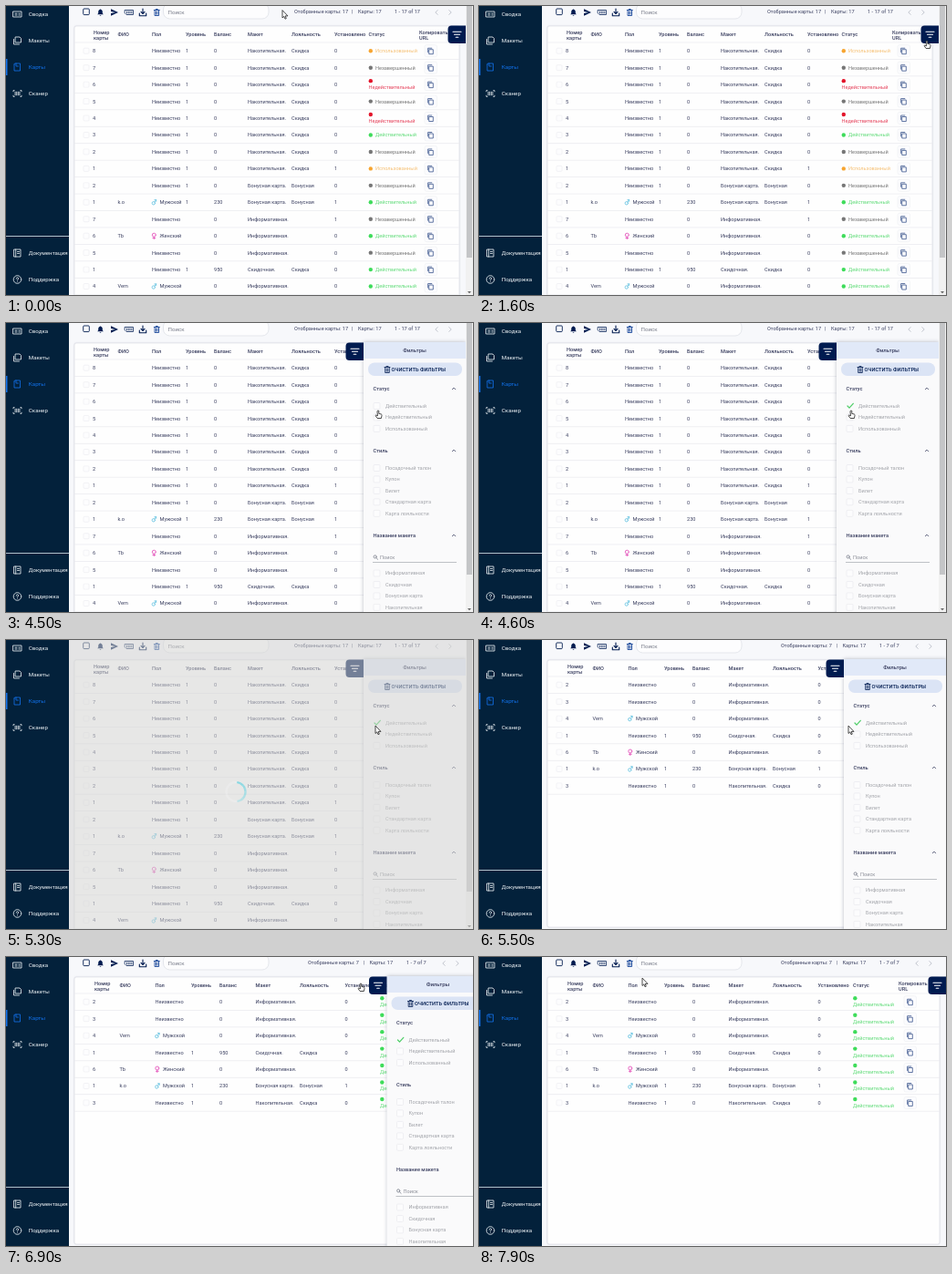
Recreate the animation shown at these times as an HTML page with a canvas. Size 512 px wide and 317 px high, loop 8000 ms.

```html
<!DOCTYPE html>
<html lang="ru">
<head>
<meta charset="utf-8">
<title>Карты</title>
<style>
html, body { margin: 0; width: 100%; height: 100%; overflow: hidden; background: #f7f8fb; }
canvas { display: block; width: 512px; height: 317px; }
</style>
</head>
<body>
<canvas id="stage"></canvas>
<script>
const W = 512, H = 317, LOOP = 8000, STEP = 100;
const SIDEBAR = 69, DRAWER = 112, ROW_TOP = 40, ROW_H = 18.45;
const FONT = 'Roboto, "Open Sans", sans-serif';
const NAVY = '#001b50', INK = '#3a3f60', LINE = '#ebecf0';
const STATUS = {
  used: ['Использованный', '#f7a531', '#f5bf72'],
  open: ['Незавершенный', '#777777', '#747474'],
  bad: ['Недействительный', '#e3142b', '#e5405a'],
  ok: ['Действительный', '#3fdc5b', '#5edb77']
};
const LAYOUT = {
  Н: ['Накопительная.', 'Скидка', '1'],
  Б: ['Бонусная карта.', 'Бонусная', '1'],
  И: ['Информативная.', '', ''],
  С: ['Скидочная.', 'Скидка', '1']
};
// number, layout, installed, status, name, gender, balance
const parse = text => text.split(';').map(r => r.split(','));
const ALL = parse('8,Н,0,used;7,Н,0,open;6,Н,0,bad;5,Н,0,open;4,Н,0,bad;3,Н,0,ok;2,Н,0,open;1,Н,1,used;2,Б,0,open;' +
  '1,Б,1,ok,k.o,m,230;7,И,1,open;6,И,0,ok,Tb,f;5,И,0,open;1,С,0,ok,,,950;4,И,0,ok,Vern,m;3,И,0,ok;2,И,0,ok');
const VALID = parse('2,И,0,ok;3,И,0,ok;4,И,0,ok,Vern,m;1,С,0,ok,,,950;6,И,0,ok,Tb,f;1,Б,1,ok,k.o,m,230;3,Н,0,ok');
const HEADS = ['Номер|карты', 'ФИО', 'Пол', 'Уровень', 'Баланс', 'Макет', 'Лояльность', 'Установлено', 'Статус', 'Копировать|URL'];
const COLS_NARROW = [96, 122.5, 160, 197, 228, 265, 313, 360, 397.5, 453];
const COLS_WIDE = [97, 124.5, 163.5, 203, 234, 273.5, 322, 371.5, 410, 460];
const GROUPS = [
  ['Статус', 72, 91, ['Действительный', 'Недействительный', 'Использованный']],
  ['Стиль', 140, 159, ['Посадочный талон', 'Купон', 'Билет', 'Стандартная карта', 'Карта лояльности']],
  ['Название макета', 233, 274.5, ['Информативная', 'Скидочная', 'Бонусная карта', 'Накопительная']]
];
const PATH = [
  [0, 303, 5], [900, 472, 38], [1600, 491, 38], [2700, 491, 38], [2800, 484, 37], [3600, 407, 80],
  [3900, 408, 96], [4600, 408, 96], [4700, 405, 94.5], [5700, 405, 94.5], [6200, 358, 57.5],
  [6600, 389, 29], [7400, 389, 29], [7900, 179, 23.5]
];
const HAND_TIMES = [[1500, 2100], [3500, 4700], [6000, 7200]];

const canvas = document.getElementById('stage');
const c = canvas.getContext('2d');
const dpr = window.devicePixelRatio || 1;
canvas.width = W * dpr;
canvas.height = H * dpr;

const clamp = v => Math.max(0, Math.min(1, v));
const smooth = v => v * v * (3 - 2 * v);

function text(s, x, y, { size = 5.6, color = INK, weight = 400, align = 'left' } = {}) {
  c.font = `${weight} ${size}px ${FONT}`;
  c.fillStyle = color;
  c.textAlign = align;
  c.textBaseline = 'alphabetic';
  c.fillText(s, x, y + size * 0.35);
}
function rect(x, y, w, h, color) {
  c.fillStyle = color;
  c.fillRect(x, y, w, h);
}
function box(x, y, w, h, r, { fill, stroke, width = 0.8 } = {}) {
  c.beginPath();
  c.roundRect(x, y, w, h, r);
  if (fill) { c.fillStyle = fill; c.fill(); }
  if (stroke) { c.strokeStyle = stroke; c.lineWidth = width; c.stroke(); }
}
// Path data is relative to the icon position.
function icon(d, x, y, { fill, stroke, width = 0.9 } = {}) {
  const p = new Path2D(d);
  c.save();
  c.translate(x, y);
  c.lineJoin = c.lineCap = 'round';
  if (fill) { c.fillStyle = fill; c.fill(p); }
  if (stroke) { c.strokeStyle = stroke; c.lineWidth = width; c.stroke(p); }
  c.restore();
}
function dot(x, y, r, color) {
  c.beginPath();
  c.arc(x, y, r, 0, 7);
  c.fillStyle = color;
  c.fill();
}

const TRASH = 'M-3-2.5H3M-1-3.5H1M-2.3-2.5V3.5H2.3V-2.5M-.8-1V2.2M.8-1V2.2';
const COPY = 'M-3 1.5V-3H1.2M-1.5-1.5H2.7V3.5H-1.5Z';
const LENS = 'M1-.6A1.6 1.6 0 1 1-2.2-.6A1.6 1.6 0 1 1 1-.6M.6.6L2.3 2.3';

function sidebar() {
  rect(0, 0, SIDEBAR, H, '#03213b');
  rect(0, 252, SIDEBAR, 1, '#b4bfca');
  rect(0, 58, 1.5, 18, '#1273ee');
  const items = [
    ['Сводка', 9, 'M-4.5-3H4.5V3H-4.5ZM-2.5-.8H-.5M-2.5 1H-.5M1.5-.8H2.8M1.5 1H2.8'],
    ['Макеты', 38, 'M-4-1.5V4H2M-2-4H2.5L4-2.5V2H-2Z'],
    ['Карты', 67, 'M-3.5-3V4H3V-4H-2.5Q-3.5-4-3.5-3M-1.5-4V-1H1'],
    ['Сканер', 96, 'M-3.4-3.4H-4.5V-2.2M-4.5 2.2V3.4H-3.4M3.4-3.4H4.5V-2.2M4.5 2.2V3.4H3.4M-2.4-1.8V1.8M-.8-1.8V1.8M.8-1.8V1.8M2.4-1.8V1.8'],
    ['Документация', 271, 'M-3.5-4H3.5V4H-3.5ZM-1.8-4V4M0-1.5H2M0 .5H2'],
    ['Поддержка', 300, 'M4.3 0A4.3 4.3 0 1 1-4.3 0A4.3 4.3 0 1 1 4.3 0M-1.2-.9Q-1-2.2 0-2.2Q1.3-2 1.2-.9Q1-.2 0 .5M0 2.1V2.2']
  ];
  for (const [name, y, d] of items) {
    const color = name === 'Карты' ? '#1273ee' : '#f2f5f8';
    icon(d, 12.5, y, { stroke: color, width: 0.8 });
    text(name, 24.8, y, { size: 6.2, color });
  }
}

function toolbar(filtered) {
  box(84.7, 3, 6.6, 6.6, 1, { stroke: NAVY, width: 0.9 });
  icon('M-3.3 2.3L-2.3 1V-1Q-2-3-.4-3.3Q0-4.4.4-3.3Q2-3 2.3-1V1L3.3 2.3ZM-1 3H1Q0 4.6-1 3', 103.5, 7, { fill: NAVY });
  icon('M-4-3.7L4 0L-4 3.7V1L1 0L-4-1Z', 119, 7, { fill: NAVY });
  icon('M-4.5-2.5H4.5V2.5H-3L-4.5 1ZM-2.5-1V1M-.7-1V1M1-1V1M2.8-1V1', 135, 7, { stroke: '#2b4270' });
  icon('M0-4V1.5M-2-.6L0 1.5L2-.6M-3.7 1V3.7H3.7V1', 150, 7, { stroke: NAVY, width: 1.1 });
  icon(TRASH, 165.3, 7, { stroke: '#1c4a9c' });
  box(172.5, -3, 115.5, 17, 7, { fill: '#fdfdfe', stroke: '#dfe1e7' });
  text('Поиск', 177.5, 6.5, { size: 6.2, color: '#777b88' });
  const n = filtered ? 7 : 17;
  const [a, bar, b, pages, chev] = filtered ? [331, 392, 398.5, 439, 480] : [316, 379, 386, 426, 472];
  text('Отобранные карты: ' + n, a, 6.5);
  text('|', bar, 6.5);
  text('Карты: 17', b, 6.5);
  text(`1 - ${n} of ${n}`, pages, 6.5);
  icon('M1.2-2.4L-1.2 0L1.2 2.4', chev, 7, { stroke: '#b4b8c2', width: 0.8 });
  icon('M-1.2-2.4L1.2 0L-1.2 2.4', chev + 15, 7, { stroke: '#b4b8c2', width: 0.8 });
}

function tableRow(row, y, cols, wide) {
  const [num, kind, installed, status, name = '', gender = '', balance = '0'] = row;
  const [layout, loyalty, level] = LAYOUT[kind];
  box(85, y - 3, 6, 6, 1, { fill: '#fdfdfe', stroke: '#eeeef2', width: 0.7 });
  text(num, 95, y);
  text(name, cols[1], y);
  if (gender) {
    const male = gender === 'm', x = cols[2] + 2.3;
    icon(male ? 'M1.2 1A1.7 1.7 0 1 1-2.2 1A1.7 1.7 0 1 1 1.2 1M.7-.3L2.3-2.7M.6-2.6L2.3-2.7L2.4-1' :
      'M2-1A2 2 0 1 1-2-1A2 2 0 1 1 2-1M0 1V3.5M-1.4 2.3H1.4', x, y, { stroke: male ? '#6cc6e2' : '#e558bd' });
    text(male ? 'Мужской' : 'Женский', cols[2] + 8.5, y);
  } else text('Неизвестно', cols[2], y);
  [level, balance, layout, loyalty, installed].forEach((s, i) => text(s, cols[3 + i], y));
  const [label, dotColor, color] = STATUS[status];
  if (wide || status === 'bad') {
    dot(cols[8] + 2.3, y - 4, 2.2, dotColor);
    text(label, cols[8], y + 3, { color });
  } else {
    dot(cols[8] + 2.3, y, 2.2, dotColor);
    text(label, cols[8] + 7.5, y, { color });
  }
  box(cols[9] + 6, y - 6.5, 13.5, 13, 2, { fill: '#fcfcfe', stroke: '#f0f1f4', width: 0.7 });
  icon(COPY, cols[9] + 12.6, y, { stroke: '#3a558c', width: 0.8 });
}

function table(filtered, right, drawerX, mouse) {
  const rows = filtered ? VALID : ALL;
  const cols = filtered ? COLS_WIDE : COLS_NARROW;
  const x = 75, w = right - 7 - x, h = filtered ? 293 : 340;
  c.save();
  c.shadowColor = 'rgba(30,40,70,.18)';
  c.shadowBlur = 2 * dpr;
  box(x, 22, w, h, 2, { fill: '#fefefe' });
  c.restore();
  box(x, 22, w, h, 2, { stroke: '#dddfe6', width: 0.7 });
  HEADS.forEach((head, i) => {
    const lines = head.split('|');
    lines.forEach((s, k) => text(s, cols[i], lines.length > 1 ? 28.8 + k * 6.2 : 31.3, { weight: 500 }));
  });
  rect(x, ROW_TOP - 0.4, w, 0.8, LINE);
  const hovered = mouse.x > x && mouse.x < drawerX ? Math.floor((mouse.y - ROW_TOP) / ROW_H) : -1;
  rows.forEach((row, i) => {
    const top = ROW_TOP + i * ROW_H;
    if (i === hovered) rect(x, top, w, ROW_H, '#e1e1e2');
    tableRow(row, top + ROW_H / 2, cols, filtered);
    rect(x, top + ROW_H - 0.4, w, 0.8, LINE);
  });
}

function drawer(x, right, checked) {
  c.save();
  c.beginPath();
  c.rect(SIDEBAR, 0, right - SIDEBAR, H);
  c.clip();
  if (x < right) {
    c.save();
    c.shadowColor = 'rgba(20,30,60,.3)';
    c.shadowBlur = 4 * dpr;
    rect(x, 21, DRAWER, H, '#fafafb');
    c.restore();
    rect(x, 21, DRAWER, 18, '#e1e9f8');
    text('Фильтры', x + 56, 30, { weight: 500, size: 6, align: 'center' });
    box(x + 5, 43.5, 103, 14.5, 7, { fill: '#dbe4f5' });
    icon(TRASH, x + 26, 51, { stroke: NAVY, width: 0.8 });
    text('ОЧИСТИТЬ ФИЛЬТРЫ', x + 30.6, 51, { size: 5.7, color: NAVY, weight: 500 });
    for (const [title, y, first, options] of GROUPS) {
      text(title, x + 10.5, y, { weight: 500, size: 5.7 });
      icon('M-1.7.8L0-.9L1.7.8', x + 99, y, { stroke: INK, width: 0.8 });
      options.forEach((s, i) => {
        const oy = first + i * 12.45;
        if (checked && oy === 91) icon('M-3 0L-1 2.2L3.3-2.7', x + 15, oy, { stroke: '#4fce68', width: 1.2 });
        else box(x + 11, oy - 3.5, 7, 7, 1, { fill: '#fcfcfd', stroke: '#eaeaee', width: 0.7 });
        text(s, x + 24, oy, { color: '#a2a4aa' });
      });
    }
    icon(LENS, x + 13.3, 257, { stroke: '#777b88', width: 0.8 });
    text('Поиск', x + 18, 257, { color: '#8b8e98' });
    rect(x + 10, 262, 92, 0.8, '#b0b3ba');
  }
  box(x - 19.5, 21.5, 19.5, 19.5, [4, 0, 0, 4], { fill: NAVY });
  icon('M-4.5-3H4.5M-3 0H3M-1.3 3H1.3', x - 9.5, 31.2, { stroke: '#ffffff', width: 1.1 });
  c.restore();
}

function scrollbar() {
  rect(504, 0, 8, H, '#f1f1f1');
  rect(505, 0, 6, 276, '#c4c5c7');
  icon('M-2-1H2L0 1.2Z', 508, 314, { fill: '#666666' });
}

function loading(t) {
  const fade = clamp((t - 4600) / 300);
  c.globalAlpha = fade;
  rect(SIDEBAR, 0, W - SIDEBAR, H, 'rgba(212,212,210,.54)');
  const ring = (from, to, color) => {
    c.strokeStyle = color;
    c.beginPath();
    c.arc(252, 166.5, 10.5, from, to);
    c.stroke();
  };
  c.lineWidth = 2.4;
  ring(0, Math.PI * 2, 'rgba(255,255,255,.2)');
  const turn = (t - 5300) / 1000 * Math.PI * 2;
  for (let i = 0; i < 8; i++) {
    const a = turn - 1.45 + i * 0.36;
    c.globalAlpha = fade * (0.9 - i * 0.07);
    ring(a, a + 0.36, '#7cd5e0');
  }
  c.globalAlpha = 1;
}

function mouseAt(t) {
  let i = 0;
  while (i < PATH.length - 2 && t >= PATH[i + 1][0]) i++;
  const [t0, x0, y0] = PATH[i], [t1, x1, y1] = PATH[i + 1];
  const k = smooth(clamp((t - t0) / (t1 - t0)));
  return { x: x0 + (x1 - x0) * k, y: y0 + (y1 - y0) * k, hand: HAND_TIMES.some(([a, b]) => t >= a && t < b) };
}
function pointer({ x, y, hand }) {
  const d = hand ? 'M-.8.4Q0-.5.8.4V3.4L3.4 4Q4.2 4.3 4 5.5L3.4 8.5H-.9L-3 5.6Q-2.8 4.4-.8 5.6Z'
    : 'M0 0V8L1.8 6.4L3 9.2L4.3 8.6L3.1 5.9H5.6Z';
  icon(d, x, y, { fill: '#ffffff', stroke: '#202020', width: 0.8 });
}

function draw(t) {
  const filtered = t >= 5500, right = filtered ? 512 : 504;
  const open = t < 4000 ? smooth(clamp((t - 1900) / 200)) : 1 - smooth(clamp((t - 6800) / 400));
  const drawerX = right - DRAWER * open;
  const mouse = mouseAt(t);
  c.setTransform(dpr, 0, 0, dpr, 0, 0);
  rect(0, 0, W, H, '#f7f8fb');
  toolbar(filtered);
  table(filtered, right, drawerX, mouse);
  drawer(drawerX, right, t >= 4600);
  if (!filtered) scrollbar();
  if (t >= 4600 && !filtered) loading(t);
  sidebar();
  pointer(mouse);
}

const start = performance.now();
function tick(now) {
  const t = Math.max(0, now - start) % LOOP;
  draw(Math.floor(t / STEP) * STEP);
  requestAnimationFrame(tick);
}
draw(0);
requestAnimationFrame(tick);
</script>
</body>
</html>
```
